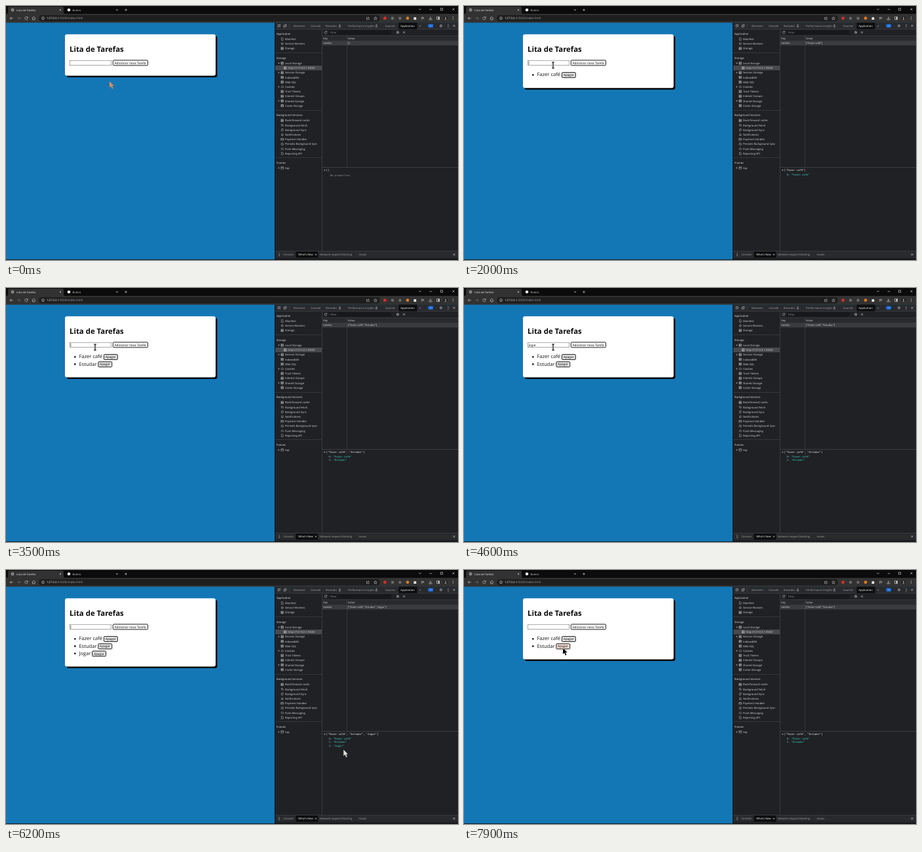
Animation of 690x388 px, one loop 8000 ms. Source, as an HTML page:

```html
<!DOCTYPE html>
<html lang="pt">
<head>
<meta charset="utf-8">
<title>Lista de Tarefas</title>
<style>
  html, body { margin: 0; width: 100%; height: 100%; overflow: hidden; background: #000; }
  svg { display: block; width: 100vw; height: 100vh; }
  text { font-family: "Open Sans", "Noto Sans", sans-serif; white-space: pre; text-rendering: geometricPrecision; }
  .mono { font-family: "DejaVu Sans Mono", "Liberation Mono", monospace; }
  .line { fill: none; stroke: #c4c6ca; stroke-width: .7; }
  #pointer { mix-blend-mode: difference; }
</style>
</head>
<body>
<svg id="stage" viewBox="0 0 690 388" xmlns="http://www.w3.org/2000/svg"></svg>
<script>
const LOOP = 8000, STEP = 100;
const UI = 4.1, FORM = 4.8, MONO = 3.92;
const stage = document.getElementById('stage');

const box = (x, y, w, h, fill, more = '') =>
  `<rect x="${x}" y="${y}" width="${w}" height="${h}" fill="${fill}" ${more}/>`;
const text = (x, y, str, size = UI, fill = '#d6d8dc', more = '') =>
  `<text x="${x}" y="${y}" font-size="${size}" fill="${fill}" ${more}>${str}</text>`;
const line = (x, y, d, more = '') =>
  `<path class="line" transform="translate(${x} ${y})" d="${d}" ${more}/>`;
const dot = (x, y, r, fill, more = '') =>
  `<circle cx="${x}" cy="${y}" r="${r}" fill="${fill}" ${more}/>`;
const ring = (x, y, r) => dot(x, y, r, 'none', 'stroke="#c4c6ca" stroke-width=".7"');
const cross = (x, y, r = 1.5) => line(x, y, `M${-r} ${-r}L${r} ${r}M${-r} ${r}L${r} ${-r}`);
const dots = (x, y) => [-1.8, 0, 1.8].map(d => dot(x, y + d, .55, '#c4c6ca')).join('');
const mono = (x, y, str, fill) => text(x, y, str, MONO, fill, 'class="mono"');

const ICON = {
  table: 'M-1.8-1.8H1.8V1.8H-1.8ZM-1.8-.5H1.8M-1.8 .7H1.8M-.6-1.8V1.8',
  file: 'M-1.3-1.9H.4L1.4-.9V1.9H-1.3Z',
  gear: 'M0-1.3A1.3 1.3 0 1 1-.01-1.3M0-2V-1.3M0 1.3V2M-2 0H-1.3M1.3 0H2M-1.4-1.4L-.9-.9M.9 .9L1.4 1.4M1.4-1.4L.9-.9M-.9 .9L-1.4 1.4',
  arrows: 'M-1 1.8V-1.6M-2-.6L-1-1.6L0-.6M1-1.8V1.6M0 .6L1 1.6L2 .6',
  sync: 'M-1.6 .3A1.6 1.6 0 0 1 1.2-1.1M1.6-.3A1.6 1.6 0 0 1-1.2 1.1M1.3-2V-.9H.2M-1.3 2V.9H-.2',
  bell: 'M-1.7 1.1H1.7M-1.2 1.1V-.3A1.2 1.2 0 0 1 1.2-.3V1.1M-.4 1.9H.4',
  card: 'M-2-1.4H2V1.4H-2ZM-2-.4H2',
  clock: 'M0-1.8A1.8 1.8 0 1 1-.01-1.8M0-1V0L.8 .6',
  cloud: 'M-1.2 1.2A1 1 0 0 1-1.2-.6A1.4 1.4 0 0 1 1.3-.5A.9 .9 0 0 1 1.3 1.2Z',
  frame: 'M-1.9-1.6H1.9V1.6H-1.9ZM-1.9-.8H1.9'
};

const GROUPS = [
  [42, 'Application', [['Manifest', 'file'], ['Service Workers', 'gear'], ['Storage', 'table']]],
  [79, 'Storage', [['Local Storage', 'table', '▾'], ['http://127.0.0.1:5500/', 'table', 'sel'],
    ['Session Storage', 'table', '▸'], ['IndexedDB', 'table'], ['Web SQL', 'table'], ['Cookies', 'cloud', '▸'],
    ['Trust Tokens', 'table'], ['Interest Groups', 'table'], ['Shared Storage', 'table', '▸'],
    ['Cache Storage', 'table']]],
  [166.5, 'Background Services', [['Back/forward cache', 'table'], ['Background Fetch', 'arrows'],
    ['Background Sync', 'sync'], ['Notifications', 'bell'], ['Payment Handler', 'card'],
    ['Periodic Background Sync', 'clock'], ['Push Messaging', 'cloud'], ['Reporting API', 'file']]],
  [239, 'Frames', [['top', 'frame', '▸']]]
];

function triangle(x, y, open) {
  return `<path transform="translate(${x} ${y})" d="${open ? 'M-1.3-.7H1.3L0 1Z' : 'M-.7-1.3V1.3L1 0Z'}" fill="#b4b6ba"/>`;
}

function sidebar() {
  let out = '';
  for (const [top, title, rows] of GROUPS) {
    if (top > 50) out += box(411, top - 7.5, 71, .5, '#4a4c50');
    out += text(413, top + 1.5, title, UI, '#e4e6ea');
    rows.forEach(([label, icon, mark], i) => {
      const y = top + 8.4 + i * 7.2, child = mark === 'sel' ? 4.5 : 0;
      if (child) out += box(411, y - 3.6, 71, 7.2, '#48494c');
      else if (mark) out += triangle(416.5, y, mark === '▾');
      out += line(421.7 + child, y, ICON[icon], 'style="stroke-width:.5"');
      out += text(426 + child, y + 1.5, label);
    });
  }
  return out;
}

function browserBar() {
  const flask = x => line(x, 30.3, 'M-.6-1.8H.6M-.4-1.8V-.4L-1.5 1.7H1.5L.4-.4V-1.8', 'style="stroke-width:.5"');
  return box(0, 0, 690, 12, '#0b0b0b') +
    '<path d="M1 12Q3 12 3 10V3Q3 1 5 1H86Q88 1 88 3V10Q88 12 90 12Z" fill="#323232"/>' +
    box(0, 12, 690, 13.5, '#323232') +
    ring(10, 6, 2) + line(10, 6, 'M-2 0H2M0-2C-1.4-1-1.4 1 0 2C1.4 1 1.4-1 0-2', 'style="stroke-width:.4"') +
    text(16, 7.6, 'Lista de Tarefas', UI, '#f1f1f1') + cross(83, 6, 1.2) +
    dot(96, 6, 2.3, '#eeeeee') + text(101.5, 7.6, 'Bulmiz', UI, '#cfcfcf') + cross(169.5, 6, 1.2) +
    line(183, 6, 'M-1.9 0H1.9M0-1.9V1.9') +
    line(632, 5, 'M-1.8-.8L0 1L1.8-.8') + line(648.5, 5.3, 'M-1.8 0H1.8') +
    line(665, 5, 'M-1.6-1.6H1.6V1.6H-1.6Z') + cross(683, 5) +
    line(8.5, 18.7, 'M2.2 0H-2.2M-.3-2L-2.3 0L-.3 2') +
    line(19.5, 18.7, 'M-2.2 0H2.2M.3-2L2.3 0L.3 2', 'opacity=".45"') +
    line(31, 18.7, 'M2-1A2.2 2.2 0 1 0 2.1 .8M2.2-2.4V-.6H.4') +
    line(42.3, 18.7, 'M-2.6 0L0-2.4L2.6 0M-1.7-.5V2.2H1.7V-.5') +
    box(50, 14, 521, 9.6, '#1e1e1f', 'rx="4.8"') +
    ring(56.5, 18.7, 2) + line(56.5, 18.7, 'M0-.2V1.1M0-1.1V-.7', 'style="stroke-width:.5"') +
    text(62.3, 20.4, '127.0.0.1<tspan fill="#a0a2a6">:5500/index.html</tspan>', 4.55, '#eeeeee') +
    line(552.5, 18.7, 'M-.5-1.3H-2V2H2V.6M-.8 .6Q-.6-1 1.6-1M.5-2.1L1.8-1L.5 .1', 'style="stroke-width:.55"') +
    line(564, 18.9, 'M0-2.5L.7-.8L2.5-.7L1.1 .5L1.5 2.3L0 1.3L-1.5 2.3L-1.1 .5L-2.5-.7L-.7-.8Z', 'style="stroke-width:.55"') +
    dot(578.5, 18.7, 2.4, '#d3312d') + dot(590, 18.7, 2.2, '#6c6d70') + dot(601.5, 18.7, 2.2, '#67696c') +
    dot(613, 18.7, 2.4, '#dc7a24') +
    '<path transform="translate(624.5 18.8)" d="M-2.2-1.4H-.8A.9 .9 0 0 1 .9-1.4H1.7V.1A.9 .9 0 0 1 1.7 1.4V2.3H-2.2V1.2A.9 .9 0 0 0-2.2-.3Z" fill="#e6e6e6"/>' +
    line(636, 18.7, 'M-2.2-1.4H1M-2.2 0H1M-2.2 1.4H-.2M1.6-1.8V1.2', 'style="stroke-width:.6"') +
    line(648, 18.7, 'M0-2.3V.8M-1.4-.5L0 .9L1.4-.5M-2.2 1.2V2.2H2.2V1.2') +
    line(659.5, 18.7, 'M-2-2H2V2H-2Z') + box(659.8, 16.7, 1.8, 4, '#d9d9d9') +
    dot(671, 18.7, 2.8, '#161616') + dot(671, 17.8, 1, '#b9a99c') + box(669.5, 19.2, 3, 2, '#8d8681', 'rx="1"') +
    dots(682.5, 18.7) +
    box(410, 25.5, 280, 362.5, '#202124') + box(410, 25.5, 1, 362.5, '#111214') +
    box(411, 25.5, 279, 10, '#292a2d') + box(411, 35.3, 279, .5, '#4a4c50') +
    line(417, 30.3, 'M1.8-.5V-1.8H-1.8V1.8H-.5M0 0L2 2M0 1.6V0H1.6', 'style="stroke-width:.55"') +
    line(426, 30.3, 'M-.8-2H2V1H.8M-2-.7H.3V2H-2Z', 'style="stroke-width:.55"') +
    box(432, 27.5, .5, 6, '#4a4c50') +
    box(599.5, 25.5, 28, 10, '#0c0d0e') +
    [[439, 'Elements'], [465, 'Console'], [488, 'Recorder'], [522, 'Performance insights'], [579, 'Sources']]
      .map(([x, s]) => text(x, 31.9, s, UI, '#a4a7ac')).join('') +
    text(602.3, 31.9, 'Application', UI, '#ffffff') + flask(509.5) + flask(565.5) +
    text(631, 31.9, '»', 5, '#b0b2b6') +
    box(644.5, 27.8, 7.5, 5, '#1a73e8', 'rx=".8"') + text(647.4, 31.7, '1', 3.6, '#ffffff') +
    line(664, 30.3, ICON.gear) + dots(675, 30.3) + cross(684, 30.3);
}

function storagePanel() {
  return box(482, 36, .6, 338.5, '#4a4c50') +
    line(488, 40.3, 'M1.5-.9A1.8 1.8 0 1 0 1.7 .7M1.8-2V-.6H.4', 'style="stroke-width:.55"') +
    box(493, 37.3, 95, 6.4, '#17181a') + text(495, 41.9, 'Filter', UI, '#8f9297') +
    ring(598, 40.3, 1.6) + line(598, 40.3, 'M-1.1-1.1L1.1 1.1') + cross(607.5, 40.3) +
    box(482.6, 45, 207.4, 8, '#292a2d') + box(482.6, 45, 207.4, .4, '#4a4c50') +
    box(482.6, 53, 207.4, 7.3, '#3a3b3e') +
    text(484.3, 50.5, 'Key') + text(522, 50.5, 'Value') + text(484.3, 58.2, 'tarefas') +
    box(520.3, 45, .5, 201, '#4a4c50') + box(482.6, 246, 207.4, .6, '#4f5155') +
    box(411, 374.5, 279, 10, '#292a2d') + box(411, 374.3, 279, .5, '#4a4c50') +
    box(442.5, 375, 33.8, 9.5, '#0c0d0e') + dots(417, 379.6) +
    text(423.5, 381.1, 'Console', UI, '#a4a7ac') + text(446.3, 381.1, 'What\'s New', UI, '#ffffff') +
    cross(473, 379.7, 1.1) + text(479, 381.1, 'Network request blocking', UI, '#a4a7ac') +
    text(538.5, 381.1, 'Issues', UI, '#a4a7ac') + cross(684, 379.6) +
    box(0, 387.2, 690, .8, '#0a0b0c');
}

stage.innerHTML = box(0, 0, 690, 388, '#1477b5') + browserBar() + sidebar() + storagePanel() +
  `<g id="live"></g>
   <text id="entry" x="98.6" y="88.7" font-size="${FORM}" fill="#111"></text>
   <rect id="caret" y="84.4" width=".5" height="5.4" fill="#000"/>
   <path id="pointer"/>`;
const [live, entry, caret, pointer] = ['live', 'entry', 'caret', 'pointer'].map(id => document.getElementById(id));

// Each task: label, key times, enter time, removal time, left edge of its button
const TASKS = [
  { label: 'Fazer café', keys: [800, 900, 1000, 1100, 1200, 1300, 1400, 1500, 1600, 1800], enter: 2000, gone: 1e9, btn: 149 },
  { label: 'Estudar', keys: [2400, 2600, 2800, 3000, 3100, 3200, 3400], enter: 3500, gone: 1e9, btn: 140.4 },
  { label: 'Jogar', keys: [3700, 3800, 3900, 3950, 4050], enter: 5000, gone: 7500, btn: 131.2 }
];
const FOCUS = 600, BLUR = 7500, BLINK = 530;

const PATH = [[0, 158, 115], [500, 136, 90.5], [5300, 136, 90.5], [5800, 534, 251], [6200, 515.3, 274.5],
  [7100, 165.7, 135], [7300, 144.5, 127.5], [7600, 144.5, 127.5], [7900, 151, 119], [8000, 151, 119]];
const ARROW = 'M0 0V9.6L2.2 7.5L3.9 11.5L5.5 10.8L3.8 6.9H6.8Z';
const BEAM = 'M-1.9-5H1.9V-4H.6V4H1.9V5H-1.9V4H-.6V-4H-1.9Z';

function pointerAt(t) {
  const i = PATH.findIndex(p => p[0] > t), [t0, x0, y0] = PATH[i - 1], [t1, x1, y1] = PATH[i];
  const u = (t - t0) / (t1 - t0), e = u * u * (3 - 2 * u);
  return [x0 + (x1 - x0) * e, y0 + (y1 - y0) * e];
}

const inside = (x, y, l, t, w, h) => x >= l && x <= l + w && y >= t && y <= t + h;

function button(x, y, w, label, fill) {
  return box(x + .45, y + .45, w - .9, 8, fill, 'rx="1.3" stroke="#0a0a0a" stroke-width=".9"') +
    text(x + 2.7, y + 6.1, label, FORM, '#161616');
}

function page(tasks, px, py) {
  const h = tasks.length ? 70.8 + 11.2 * tasks.length : 63.3;
  let out = box(92.5, 45.7, 230, h, '#030507', 'rx="3"') + box(90, 43.2, 230, h, '#ffffff', 'rx="3"') +
    text(97, 69.6, 'Lita de Tarefas', 11.4, '#0a0a0a', 'font-weight="700"') +
    box(97.3, 83.2, 63.4, 7.5, '#ffffff', 'stroke="#6f6f6f" stroke-width=".6"') +
    button(162.8, 82.4, 54.2, 'Adicionar nova Tarefa', '#f7f7f7');
  tasks.forEach(({ label, btn }, i) => {
    const y = 101 + 11.2 * i, hover = inside(px, py, btn, y, 21.8, 8.9);
    out += dot(105.3, y + 4.2, 1.3, '#0a0a0a') + text(111.4, y + 6.3, label, 7.6, '#161616') +
      button(btn, y, 21.8, 'Apagar', hover ? '#efd8cf' : '#dedede');
  });
  return out;
}

function stored(tasks) {
  const names = tasks.map(k => `"${k.label}"`);
  let out = text(522, 58.2, `[${names.join()}]`) + triangle(486.3, 251, true) +
    mono(488.8, 252.4, `[${names.join(', ')}]`, '#e8eaed');
  if (!names.length) return out + mono(495, 260.3, 'No properties', '#8d9095');
  names.forEach((s, i) => {
    out += mono(492.4, 258.5 + 5.7 * i, `<tspan fill="#5db0d7">${i}</tspan>: <tspan fill="#35d4c7">${s}</tspan>`, '#d6d8dc');
  });
  return out;
}

function render(t) {
  const [px, py] = pointerAt(t);
  const tasks = TASKS.filter(k => t >= k.enter && t < k.gone);
  live.innerHTML = page(tasks, px, py) + stored(tasks);

  const current = TASKS.find(k => t < k.enter);
  entry.textContent = current ? current.label.slice(0, current.keys.filter(k => k <= t).length) : '';
  const lastKey = Math.max(FOCUS, ...TASKS.flatMap(k => [...k.keys, k.enter]).filter(k => k <= t));
  const lit = t >= FOCUS && t < BLUR && Math.floor((t - lastKey) / BLINK) % 2 === 0;
  caret.setAttribute('visibility', lit ? 'visible' : 'hidden');
  caret.setAttribute('x', 98.7 + (entry.textContent ? entry.getComputedTextLength() : 0));

  pointer.setAttribute('d', inside(px, py, 97, 83, 64, 8) ? BEAM : ARROW);
  pointer.setAttribute('fill', '#fff');
  pointer.setAttribute('transform', `translate(${px} ${py})`);
}

let shown = -1;
const start = performance.now();
function tick() {
  const t = Math.floor((performance.now() - start) % LOOP / STEP) * STEP;
  if (t !== shown) render(shown = t);
  requestAnimationFrame(tick);
}
tick();
</script>
</body>
</html>
```
